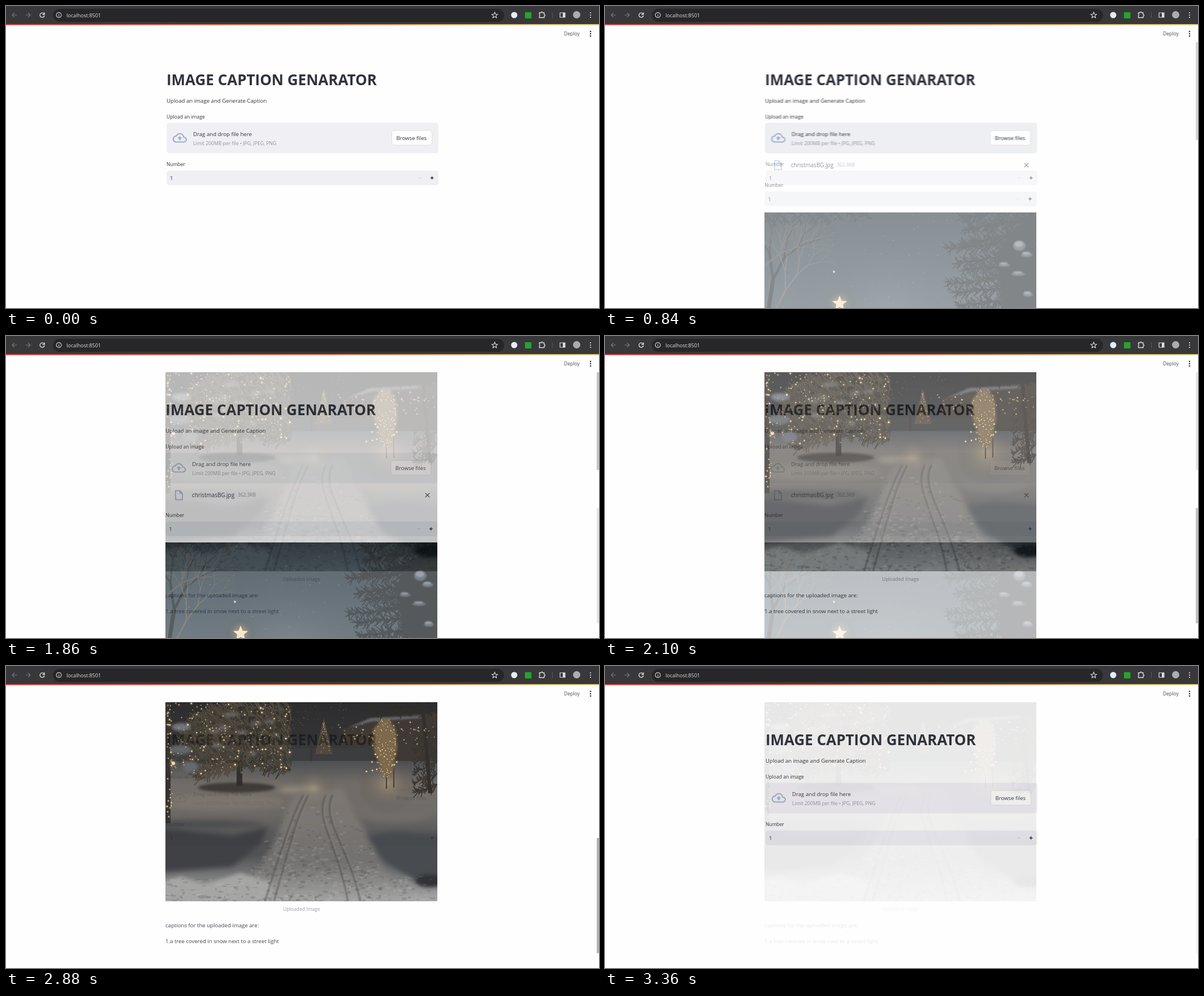
An HTML page with a canvas that plays this animation: 1049x534 px, repeating every 3420 ms.

```html
<!DOCTYPE html>
<html lang="en">
<head>
<meta charset="utf-8">
<title>Image caption generator</title>
<style>
html, body { margin: 0; width: 100%; height: 100%; overflow: hidden; background: #fefefe; }
canvas { display: block; }
</style>
</head>
<body>
<canvas id="stage" width="1049" height="534"></canvas>
<script>
const W = 1049, H = 534, HOLD = 600, STEP = 60, PART = 1140;
const INK = '#31333f', GREY = '#92949c', ICON = '#9dafcb';
const CLOUD = 'M19.35 10.04C18.67 6.59 15.64 4 12 4 9.11 4 6.6 5.64 5.35 8.04 2.34 8.36 0 10.91 0 14c0 3.31 2.69 6 6 6h13c2.76 0 5-2.24 5-5 0-2.64-2.05-4.78-4.65-4.96zM19 18H6c-2.21 0-4-1.79-4-4s1.79-4 4-4h.71C7.37 7.69 9.48 6 12 6c3.04 0 5.5 2.46 5.5 5.5v.5H19c1.66 0 3 1.34 3 3s-1.34 3-3 3zM8 13h2.55v3h2.9v-3H16l-4-4z';
let g, seed;

const rnd = (a = 0, b = 1) => {
  seed = seed * 16807 % 2147483647;
  return a + (b - a) * seed / 2147483647;
};
function rect(color, x, y, w, h, r = 0) {
  g.fillStyle = color;
  g.beginPath();
  g.roundRect(x, y, w, h, r);
  g.fill();
}
function ellipse(color, x, y, rx, ry = rx) {
  g.fillStyle = color;
  g.beginPath();
  g.ellipse(x, y, rx, ry, 0, 0, 7);
  g.fill();
}
function poly(color, ...p) {
  g.fillStyle = color;
  g.beginPath();
  for (let i = 0; i < p.length; i += 2) g.lineTo(p[i], p[i + 1]);
  g.fill();
}
function stroke(color, width, d, x = 0, y = 0) {
  g.save();
  g.translate(x, y);
  g.strokeStyle = color;
  g.lineWidth = width;
  g.stroke(new Path2D(d));
  g.restore();
}
function text(s, x, y, size = 9.65, color = INK, weight = 400) {
  g.font = `${weight} ${size}px "Open Sans", "Noto Sans", sans-serif`;
  g.fillStyle = color;
  g.fillText(s, x, y);
}
function gradient(x0, y0, x1, y1, ...colors) {
  const f = g.createLinearGradient(x0, y0, x1, y1);
  colors.forEach((c, i) => f.addColorStop(i / (colors.length - 1), c));
  return f;
}
function glow(color, x, y, r) {
  const f = g.createRadialGradient(x, y, 0, x, y, r);
  f.addColorStop(0, color);
  f.addColorStop(1, 'transparent');
  ellipse(f, x, y, r);
}
function star(x, y, r, inner) {
  g.beginPath();
  for (let i = 0; i < 10; i++) {
    const a = i * Math.PI / 5 - Math.PI / 2, q = i % 2 ? inner : r;
    g.lineTo(x + q * Math.cos(a), y + q * Math.sin(a));
  }
  g.closePath();
}
function lamp(x, y, r = 1) {
  glow('rgba(235,190,120,.4)', x, y, r * 4.5);
  ellipse('#f3d9a6', x, y, r);
}
function soft(radius, draw) {
  g.filter = `blur(${radius}px)`;
  draw();
  g.filter = 'none';
}

function browser() {
  rect('#fefefe', 0, 0, W, H);
  rect('#38373a', 0, 0, W, 33);
  rect('#272628', 83, 5, 798, 23, 11.5);
  rect(gradient(0, 0, W, 0, '#dc4a4c', '#e58558', '#e6cf82'), 0, 32, W, 2);
  stroke('#77767a', 1.2, 'M4.5 0H-4M0-4L-4 0 0 4', 15, 16);
  stroke('#77767a', 1.2, 'M-4.5 0H4M0-4L4 0 0 4', 39, 16);
  stroke('#dddde0', 1.4, 'M3.2-2.4A4 4 0 1 0 4 1M4-4.5V-1H.5', 64, 16);
  stroke('#dddde0', 1.1, 'M-4.5 0A4.5 4.5 0 1 1 4.5 0A4.5 4.5 0 1 1-4.5 0M0-.5V2.7M0-2.6V-1.5', 93.5, 16);
  text('localhost:8501', 107, 19.7, 9.05, '#dedee0');
  star(864.5, 16.4, 5.4, 2.4);
  g.strokeStyle = '#dddde0';
  g.lineWidth = 1.1;
  g.stroke();
  ellipse('#e5edf9', 899, 16, 5.5);
  rect('#25a32d', 918, 11, 11.5, 11, 1);
  stroke('#dddde0', 1.3, 'M-4.5-3.5H-1.5A1.5 1.5 0 0 1 1.5-3.5H4V-.5A1.5 1.5 0 0 1 4 2.5V5H-4.5V2A1.7 1.7 0 0 0-4.5-1Z', 948, 15.5);
  rect('#59585c', 966, 11, 1, 10);
  stroke('#dddde0', 1.2, 'M-4.4-4H4.4V4H-4.4Z', 984.5, 16);
  rect('#dddde0', 985, 12, 4, 8);
  ellipse('#aaadae', 1009.5, 15.5, 6.5);
  for (const y of [12, 16, 20]) ellipse('#dddde0', 1034, y, 1.1);
  for (const y of [45, 49, 53]) ellipse(INK, 1034, y, 1.3);
  text('Deploy', 987, 52.3, 8.6, '#4a4c56');
}

function form(x, panel, file) {
  text('IMAGE CAPTION GENARATOR', x, 139.6, 26, '#30323d', 700);
  text('Upload an image and Generate Caption', x, 171);
  text('Upload an image', x, 198.6, 8.6);
  rect(panel, x, 206.5, 481, 54, 5);
  g.save();
  g.translate(x + 10.8, 220.5);
  g.scale(1.05, 1.05);
  g.fillStyle = ICON;
  g.fill(new Path2D(CLOUD), 'evenodd');
  g.restore();
  text('Drag and drop file here', x + 47, 229.6);
  text('Limit 200MB per file • JPG, JPEG, PNG', x + 47, 246, 8.65, GREY);
  rect('#dfe0e4', x + 398, 219.5, 72, 27, 5);
  rect('#fefefe', x + 399, 220.5, 70, 25, 4);
  text('Browse files', x + 406.5, 236.6);
  const dy = file ? 37 : 0;
  if (file) {
    stroke(ICON, 1.6, 'M1 1H8.5L13 5.5V17H1ZM8.5 1V5.5H13', 299, 272.5);
    text('christmasBG.jpg', 329, 284.5, 9.9);
    text('362.3KB', 410, 284.3, 8.4, GREY);
    stroke(INK, 1.2, 'M-3.7-3.7L3.7 3.7M3.7-3.7L-3.7 3.7', 745.5, 281.5);
  }
  text('Number', x, 283 + dy, 8.5);
  rect(panel, x, 291 + dy, 481, 26, 5);
  text('1', x + 6, 307.6 + dy);
  stroke('#cfd0d6', 1.1, 'M-2.5 0H2.5', x + 448, 304 + dy);
  stroke(INK, 1.5, 'M-2.8 0H2.8M0-2.8V2.8', x + 469.6, 304 + dy);
}

function photo(y, h, draw) {
  g.save();
  g.beginPath();
  g.rect(282, y, 481, h);
  g.clip();
  seed = 77;
  draw();
  g.restore();
}

function branch(color, x, y, angle, len, width, depth) {
  const x2 = x + len * Math.cos(angle), y2 = y + len * Math.sin(angle);
  stroke(color, width, `M${x} ${y}L${x2} ${y2}`);
  if (!depth) return;
  for (const side of [-1, 1])
    branch(color, x2, y2, angle + side * rnd(.1, .55), len * rnd(.68, .88), width * .66, depth - 1);
}
function bough(color, x, y, x2, y2, n, size) {
  for (let i = 0; i < n; i++) {
    const t = i / n, s = size * (1.15 - t * .6);
    const px = x + (x2 - x) * t, py = y + (y2 - y) * t;
    stroke(color, 1.5, `M${px} ${py}l${rnd(-s, 0)} ${rnd(-s, s)}`);
  }
}

function nightSky() {
  rect(gradient(0, 366, 0, 534, '#17242d', '#243541', '#344550'), 282, 365, 482, 169);
  glow('rgba(120,130,140,.3)', 500, 560, 190);
  for (let i = 0; i < 70; i++) ellipse('rgba(190,200,205,.5)', rnd(283, 640), rnd(368, 520), rnd(.3, .8));
  glow('rgba(255,230,180,.5)', 405, 470, 5);
  ellipse('#fff0d0', 405, 470, 1.4);
  branch('#111619', 288, 545, -1.42, 62, 7, 6);
  branch('#5a5048', 300, 540, -1.1, 42, 3, 6);
  branch('#3f3c39', 282, 460, -.7, 36, 3, 5);
  for (let i = 0; i < 8; i++) bough('#10171b', 282 + i * 24, 362, 305 + i * 24, 390 - i * 2, 24, 14);
  for (let i = 0; i < 10; i++) {
    const y = 352 + i * 20;
    bough('#0b1114', 775, y, (i % 3 ? 620 : 592) + rnd(-10, 18) + (i < 1 ? 45 : 0), y + rnd(12, 34), 190, 22);
  }
  soft(2, () => poly('#0b1114', 763, 366, 727, 390, 690, 440, 704, 534, 764, 534));
  const snow = (x, y, rx, ry) => soft(1.2, () => {
    ellipse('#3f4955', x, y + 2, rx, ry);
    ellipse('#6f7986', x - 1, y - 1, rx * .7, ry * .6);
  });
  snow(733, 422, 11, 9);
  snow(746, 438, 10, 4);
  snow(706, 456, 10, 3);
  snow(731, 472, 12, 3);
  snow(748, 508, 9, 4);
  glow('rgba(255,205,130,.55)', 415, 525, 28);
  star(415, 526, 14, 6);
  g.fillStyle = '#f8dfab';
  g.fill();
}

function ground() {
  rect(gradient(0, 168, 0, 416, '#383b40', '#635d57', '#625d57', '#4a4949', '#3d3e40', '#6d6e6e', '#a0a09f'), 282, 168, 482, 249);
  soft(5, () => {
    ellipse('#6e675f', 380, 240, 110, 15);
    ellipse('#8b8071', 520, 219, 38, 6);
    ellipse('#37383a', 345, 280, 110, 7);
    poly(gradient(0, 215, 0, 416, '#6f6a64', '#6a6662', '#626160', '#999998'),
      515, 222, 595, 216, 618, 260, 640, 300, 705, 425, 400, 425, 470, 320, 500, 250);
    ellipse('#615d59', 690, 252, 72, 24);
    poly('#292b2f', 270, 285, 330, 292, 400, 300, 465, 284, 450, 315, 400, 355, 270, 365);
    poly('#33373b', 640, 300, 690, 292, 780, 300, 780, 392, 725, 380, 675, 350);
  });
  soft(3, () => {
    poly('#9b9b99', 270, 384, 310, 372, 350, 386, 415, 366, 470, 384, 470, 425, 270, 425);
    ellipse('#191c1f', 748, 380, 24, 11);
  });
  for (let i = 0; i < 700; i++) {
    const y = 418 - 170 * rnd() * rnd(), half = 50 + (y - 230) * .5;
    const x = y > 372 ? rnd(284, 760) : 550 + rnd(-half, half);
    ellipse(rnd() < .5 ? 'rgba(200,198,194,.15)' : 'rgba(30,32,36,.17)', x, y, rnd(1, 5), rnd(.7, 2.5));
  }
  soft(1, () => {
    for (const [x, end] of [[526, 458], [535, 474], [566, 605], [578, 627]]) {
      const d = `M${x} 228C${x - 22} 270 ${(x + end) / 2} 310 ${end} 416`;
      stroke('rgba(40,38,37,.42)', 3, d);
      stroke('rgba(165,157,147,.28)', 1.5, d, 3);
    }
  });
}

function snowyRoad() {
  rect(gradient(0, 64, 0, 190, '#141415', '#1b1c1e', '#303338'), 282, 64, 482, 130);
  for (let i = 0; i < 25; i++) ellipse('#8c8c8c', rnd(505, 640), rnd(66, 110), .5);
  // house and distant trees
  soft(1.5, () => {
    poly('#28221d', 595, 112, 645, 92, 780, 80, 780, 190, 690, 170, 600, 160);
    poly('#51545a', 605, 109, 645, 92, 735, 88, 735, 92, 648, 98);
    rect('#262728', 490, 145, 160, 22);
  });
  branch('#211d1a', 540, 186, -1.57, 32, 3, 6);
  poly('#3f3527', 562, 92, 547, 156, 578, 156);
  ground();
  glow('rgba(255,214,150,.2)', 545, 215, 40);
  glow('rgba(255,205,130,.3)', 675, 207, 55);
  // decorated fir
  soft(2, () => ellipse('#2b2622', 408, 215, 68, 9));
  rect('#1c1714', 408, 160, 10, 52);
  for (let i = 0; i < 15; i++) {
    const y = 62 + i * 8, reach = 85 + 25 * Math.sin(i / 4);
    bough(i % 2 ? '#302a20' : '#40372a', 415, y, 415 - reach, y + 28, 75, 18);
    bough(i % 2 ? '#40372a' : '#262219', 505, y + 10, 408, y, 75, 18);
  }
  soft(2.5, () => {
    for (let i = 0; i < 9; i++) ellipse('rgba(125,124,120,.5)', rnd(315, 480), rnd(80, 165), rnd(7, 14), 4);
    ellipse('#63676c', 310, 108, 17, 7);
    ellipse('#53575d', 326, 178, 14, 10);
    ellipse('#51555a', 308, 148, 20, 8);
  });
  for (let i = 0; i < 190; i++) lamp(410 + rnd(-115, 95), 66 + 125 * rnd(), .5 + 1.3 * rnd() * rnd());
  // left post, hanging lights and right-hand trees
  rect('#201c18', 282, 64, 9, 214);
  for (let i = 0; i < 38; i++) lamp(288 + rnd(-4, 6), rnd(66, 272), rnd(.7, 1.4));
  lamp(296, 172, 3);
  for (let i = 0; i < 7; i++) bough('#191814', 645 + i * 18, 60, 665 + i * 18, 88, 28, 16);
  for (let i = 0; i < 6; i++) bough('#241f1a', 764, 110 + i * 20, 722, 135 + i * 18, 45, 16);
  stroke('#1b1714', 6, 'M738 80L750 225');
  for (let i = 0; i < 60; i++) lamp(rnd(585, 760), 120 + 14 * Math.sin(i) + rnd(-8, 8), rnd(.4, 1));
  for (let i = 0; i < 24; i++) {
    const t = rnd();
    lamp(562 + rnd(-13, 13) * t, 95 + t * 58, .5);
  }
  // lit lantern
  stroke('#302922', 2, 'M673 190V217M686 180V215');
  soft(2, () => poly('#6f5839', 665, 94, 650, 112, 651, 148, 669, 196, 681, 196, 692, 145, 689, 112, 677, 94));
  for (let i = 0; i < 120; i++) {
    const t = rnd(), span = 24 * Math.min(1, .5 + t * 2, 1.35 - t);
    lamp(671 + rnd(-span, span), 94 + t * 102, rnd(.4, .9));
  }
  for (let i = 0; i < 10; i++) lamp(rnd(635, 705), rnd(150, 187), 1.2);
}

function scene(draw) {
  const layer = document.createElement('canvas');
  layer.width = W;
  layer.height = H;
  g = layer.getContext('2d');
  browser();
  draw();
  return layer;
}
const scenes = [
  scene(() => form(284, '#f0eff4', false)),
  scene(() => {
    form(282.3, '#eceff2', true);
    photo(365, 169, nightSky);
    rect('#ababab', 1045, 64, 4, 173, 1);
  }),
  scene(() => {
    photo(64, 352, snowyRoad);
    text('Uploaded Image', 490, 433, 8.55, GREY);
    text('captions for the uploaded image are:', 282, 461.6);
    text('1.a tree covered in snow next to a street light', 282, 490.2);
    rect('#ababab', 1045, 304, 4, 204, 1);
  })
];

const stage = document.getElementById('stage').getContext('2d');
const start = performance.now();
function frame(now) {
  const t = Math.max(0, now - start) % (PART * 3);
  const part = Math.floor(t / PART), local = t % PART;
  stage.globalAlpha = 1;
  stage.drawImage(scenes[part], 0, 0);
  if (local >= HOLD) {
    stage.globalAlpha = (Math.floor((local - HOLD) / STEP) + 1) / 10;
    stage.drawImage(scenes[(part + 1) % 3], 0, 0);
  }
  requestAnimationFrame(frame);
}
frame(start);
</script>
</body>
</html>
```
